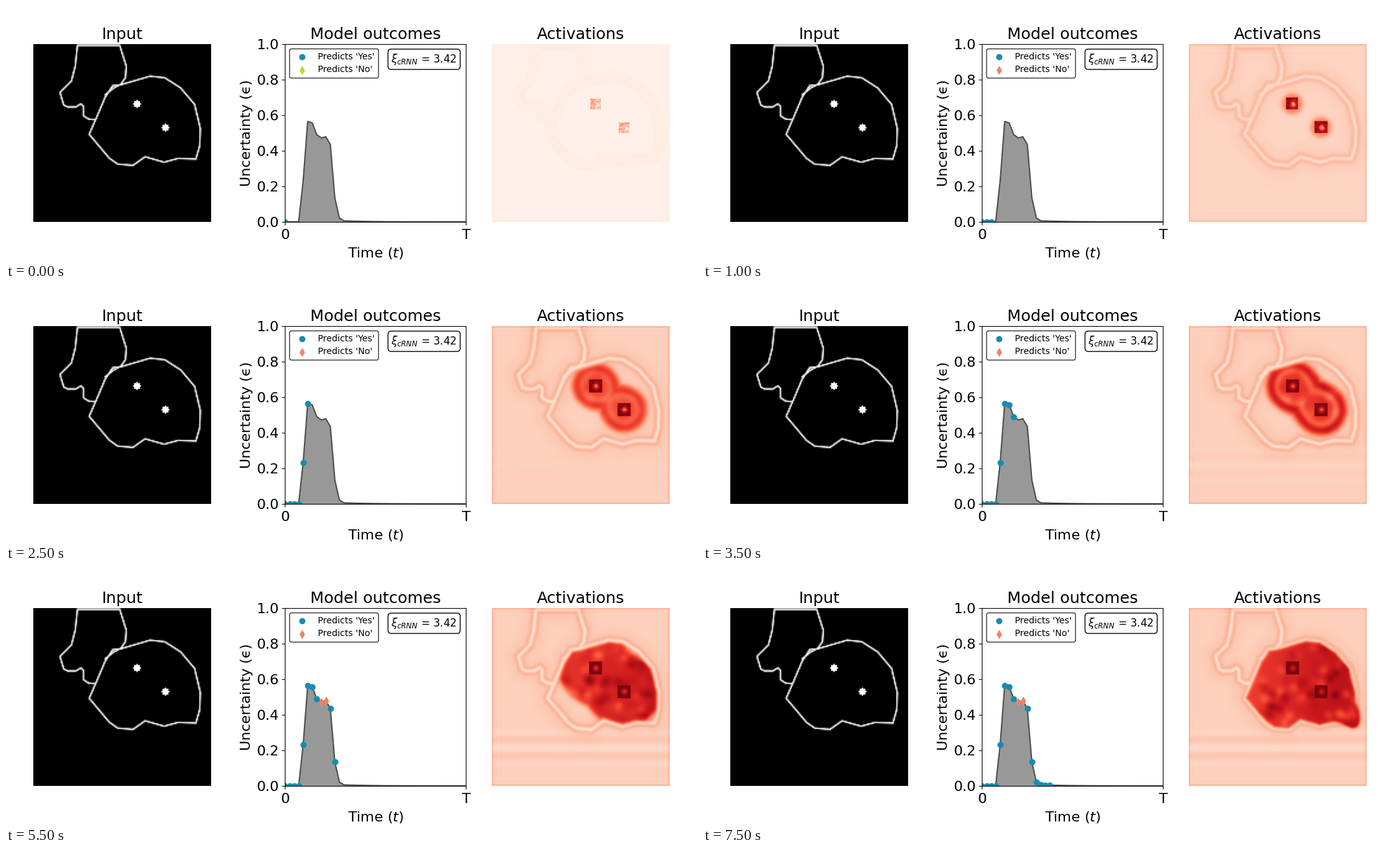
Write a matplotlib script that moves like this. It is 1088 px wide and 400 px high and loops after 8 s.

```python
import numpy as np
import matplotlib.pyplot as plt
from matplotlib.animation import FuncAnimation
from matplotlib.path import Path

W, H, DPI = 1088, 400, 100
FRAMES, STEP = 16, 500
N = 150
SIZE = 280
LEFT, TOP = 43, 60

# Stage coordinates of the two outlines and the two dots
BIG = [(181, 124), (227, 110.5), (250, 113), (275, 129), (297, 155),
       (306, 193), (305, 220), (299, 241), (271, 240), (249, 246),
       (219, 237.5), (200, 251), (176, 249), (163, 240), (131, 202),
       (142, 177), (156, 144), (168, 125.5), (181, 124)]
SMALL = [(140, 179), (130, 178), (122, 173), (122, 158), (118, 154),
         (110, 159), (97, 159), (91, 156), (85, 136), (103, 118),
         (109, 95), (112.5, 62), (179, 62), (189.5, 95), (188, 113),
         (181, 123), (170, 129), (156, 140)]
DOTS = [(206, 154), (251, 191)]

PEAK = [.232, .565, .557, .491, .472, .479, .436, .135, .022]
PEAK_START = 4
NO_STEPS = (8, 9)
YES_COLOR = "#178bb0"
NO_COLOR, NO_FLASH = "#ee8468", "#c7d32e"
FLASH_EVERY = 13

rng = np.random.default_rng(4)
axis = (np.arange(N) + .5) * SIZE / N
X, Y = np.meshgrid(LEFT + axis, TOP + axis)


def bump(d, width):
    return np.exp(-(d / width) ** 2)


def ramp(k, start, end):
    return np.clip((k - start) / (end - start), 0, 1)


def dist(x, y):
    return np.hypot(X - x, Y - y)


def seg_dist(a, b):
    (x0, y0), (x1, y1) = a, b
    dx, dy = x1 - x0, y1 - y0
    t = np.clip(((X - x0) * dx + (Y - y0) * dy) / (dx * dx + dy * dy), 0, 1)
    return dist(x0 + t * dx, y0 + t * dy)


def line_dist(pts):
    return np.min([seg_dist(a, b) for a, b in zip(pts, pts[1:])], axis=0)


d_big = line_dist(BIG)
d_line = np.minimum(d_big, line_dist(SMALL))
inside = Path(BIG).contains_points(np.c_[X.ravel(), Y.ravel()]).reshape(N, N)
depth = np.where(inside, d_big, -d_big)
edge = np.minimum(np.minimum(X - LEFT, LEFT + SIZE - X),
                  np.minimum(Y - TOP, TOP + SIZE - Y))
d_dot = np.minimum(*[dist(*p) for p in DOTS])
d_link = seg_dist(*DOTS)
grain = rng.uniform(-1, 1, (N, N))
texture = [(bump(dist(rng.uniform(135, 305), rng.uniform(110, 250)), 7.5),
            rng.uniform(0, 2 * np.pi)) for _ in range(70)]


def input_image():
    img = .95 * np.clip((1.95 - d_line) / 1.25, 0, 1)
    for x, y in DOTS:
        dx, dy = abs(X - x), abs(Y - y)
        far, near = np.maximum(dx, dy), np.minimum(dx, dy)
        img[(far < 4.6) | ((near < 1.2) & (far < 6.6))] = 1
    return img


def background(k):
    grow = 1 - .75 * np.exp(-1.3 * k)
    settle = ramp(k, 0, 3)
    v = .18 - .15 * np.exp(-1.1 * k)
    v = v + grow * (.065 * bump(d_line - 5, 3) + .035 * bump(d_line, 20))
    v += (.01 - .1 * settle) * bump(d_line, 2.5)
    v += grow * .1 * bump(edge, 2.5)
    v += settle * .025 * np.cos(.9 * edge) * np.exp(-edge / 9)
    waves = np.cos(2 * np.pi * (Y - 293) / 26) * bump(Y - 280, 28)
    return v + ramp(k, 4, 11) * .035 * waves


def filling(k):
    """Heat of the spreading fill and how much of it covers each point."""
    join = .5 * ramp(k, 3, 7)
    reach = (1 - join) * d_dot + join * d_link
    radius = 5.9 * k + 8 * np.sin(np.pi * (k - 1) / 6)
    late = ramp(k, 8, 15)
    room = depth - 5 + 3 * late + 14 * late * bump(dist(312, 240), 25)
    cover = 1 / (1 + np.exp((reach - radius) / 2.2)) / (1 + np.exp(-room / 1.3))

    heat = .74 - .5 * np.exp(-k / 4) + .0012 * late * (X - 225)
    heat = heat + bump(k - 7, 3) * (.1 * bump(reach - radius + 9, 6)
                                    - .14 * bump(reach - .58 * radius, 6))
    for spot, phase in texture:
        heat = heat + .13 * ramp(k, 3, 11) * spot * np.cos(phase + .45 * k)
    return heat, cover


def activation(k):
    v = background(k)
    if k > 1:
        heat, cover = filling(k)
        v = v * (1 - cover) + heat * cover

    # Square cores with a bright centre
    core = .96 - .66 * np.exp(-1.2 * k)
    shift = 1 + 3 * np.exp(-k)
    half = 8.5 + 1.5 * ramp(k, 0, 3)
    for x, y in DOTS:
        patch = core + .12 * np.exp(-k / 4) * grain
        patch -= .85 * core * np.exp(-k / 12) * bump(dist(x + shift, y + shift / 2), 4)
        patch -= .25 * core * np.exp(-k / 2) * bump(dist(x + 9, y + 9), 6)
        v = np.where(np.maximum(abs(X - x), abs(Y - y)) < half, patch, v)
    return np.clip(v, 0, 1)


def panel(x, width, title):
    ax = fig.add_axes([x / W, 1 - (TOP + SIZE) / H, width / W, SIZE / H])
    ax.set_title(title, fontsize=18)
    return ax


def picture(x, title, data, cmap):
    ax = panel(x, SIZE, title)
    ax.set_axis_off()
    return ax.imshow(data, cmap=cmap, vmin=0, vmax=1, aspect="auto")


plt.rcParams["font.family"] = "DejaVu Sans"
fig = plt.figure(figsize=(W / DPI, H / DPI), dpi=DPI, facecolor="white")

picture(LEFT, "Input", input_image(), "gray")
maps = [activation(k) for k in range(FRAMES)]
act = picture(765, "Activations", maps[0], "Reds")

ax = panel(439.4, 285, "Model outcomes")
steps = np.arange(41)
peak_end = PEAK_START + len(PEAK)
curve = np.where(steps < PEAK_START, 0, .006 * np.exp((peak_end - steps) / 6))
curve[PEAK_START:peak_end] = PEAK
points = np.c_[steps, curve]
ax.fill_between(steps, curve, color="#989898", lw=0)
ax.plot(steps, curve, color="#4c4c4c", lw=1.5)
yes = ax.scatter([], [], marker="o", color=YES_COLOR, label="Predicts 'Yes'",
                 zorder=2.2)
no = ax.scatter([], [], marker="d", color=NO_COLOR, label="Predicts 'No'",
                zorder=2.2)
ax.set(xlim=(0, 40), ylim=(0, 1))
ax.set_xticks([0, 40], ["0", "T"])
ax.tick_params(labelsize=16)
ax.tick_params(axis="x", pad=4.2)
ax.set_xlabel("Time ($t$)", fontsize=16, labelpad=5.5)
ax.set_ylabel("Uncertainty (ϵ)", fontsize=16)
legend = ax.legend(loc="upper left", fontsize=10, edgecolor="black")
no_key = legend.legend_handles[1]
ax.text(.95, .954, r"$\xi_{cRNN}$ = 3.42", transform=ax.transAxes, fontsize=12,
        ha="right", va="top", bbox=dict(boxstyle="round", facecolor="white"))


def draw(k):
    shown = points[:k + 1]
    is_no = np.isin(shown[:, 0], NO_STEPS)
    yes.set_offsets(shown[~is_no])
    no.set_offsets(shown[is_no])
    for marks in (no, no_key):
        marks.set_color(NO_COLOR if k % FLASH_EVERY else NO_FLASH)
    act.set_data(maps[k])
    return yes, no, act


anim = FuncAnimation(fig, draw, frames=FRAMES, interval=STEP, repeat=True,
                     repeat_delay=0, init_func=lambda: draw(0))
plt.show()
```
